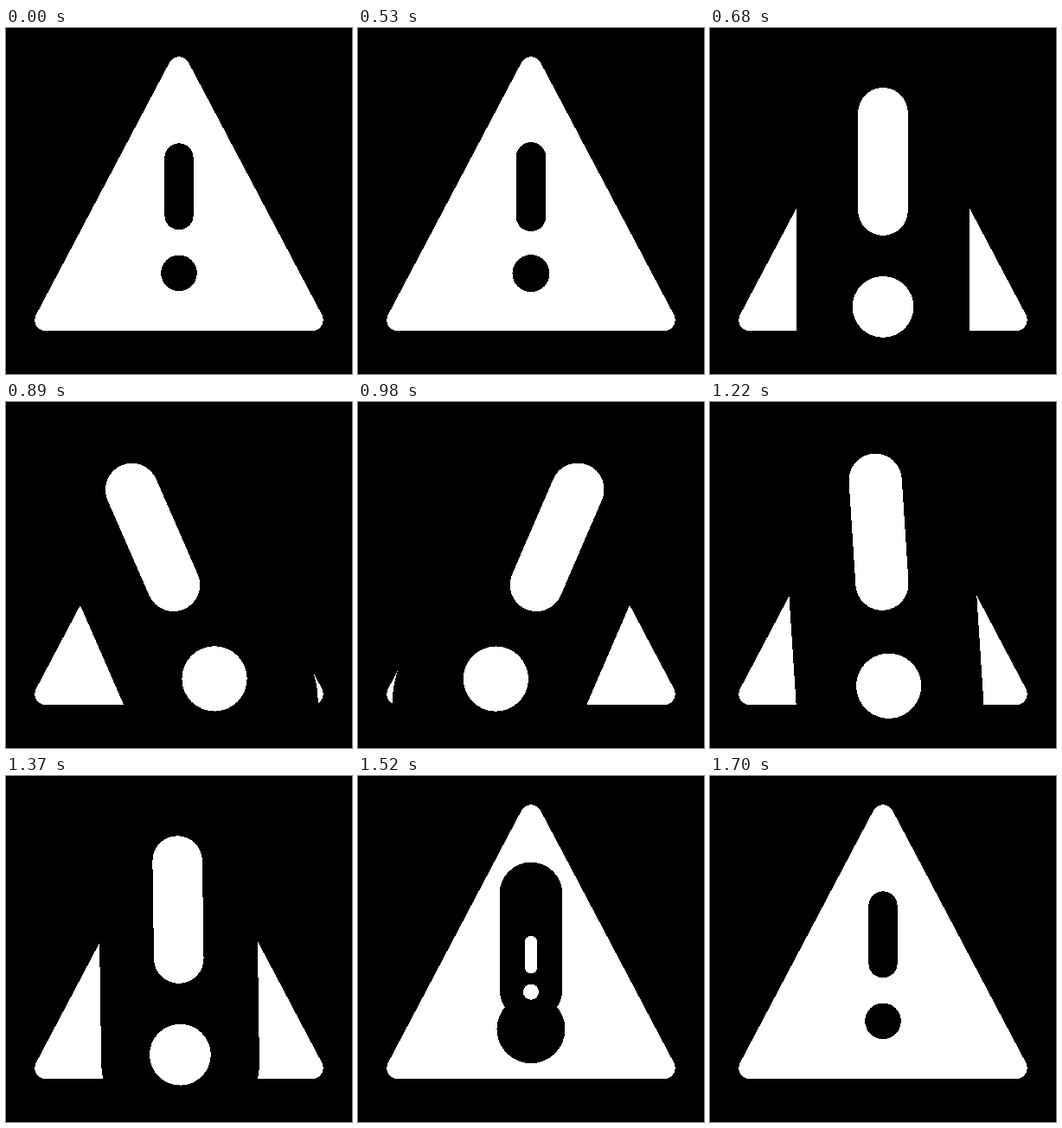
Recreate the animation shown at these times as an HTML page. Size 400 px wide and 400 px high, loop 1.73 s.

```html
<!DOCTYPE html>
<html lang="en">
<head>
<meta charset="utf-8">
<title>Warning sign</title>
<style>
  html, body { margin: 0; width: 100%; height: 100%; overflow: hidden; background: #000; }
  svg { display: block; width: 100%; height: 100%; }
  line { stroke-linecap: round; }
</style>
</head>
<body>
<svg viewBox="0 0 400 400" shape-rendering="crispEdges">
  <path d="M200 45.8 354.2 337.5H45.8Z" fill="#fff" stroke="#fff" stroke-width="25" stroke-linejoin="round"/>
  <g id="mark">
    <g fill="#000" stroke="none">
      <line id="holeBar" x1="200" x2="200" stroke="#000"/>
      <circle id="holeDot" cx="200"/>
    </g>
    <g id="sign" fill="#fff">
      <line x1="200" y1="149.8" x2="200" y2="216.6" stroke="#fff" stroke-width="34"/>
      <circle cx="200" cy="282.3" r="20.9"/>
    </g>
  </g>
</svg>
<script>
const LOOP = 1730, HOLD = 530, STEP = 30;
const PIVOT = 226, SIGN_CENTER = 224.6, SIGN_SCALE = 1.8;

// [step, degrees]
const SHAKE = [[7.3, 0], [10.3, 25], [13.3, -25], [16.33, 25],
               [19.38, -25], [22.35, 25], [25.35, -25], [29.45, 0]];

const $ = id => document.getElementById(id);
const mark = $('mark'), sign = $('sign'), holeBar = $('holeBar'), holeDot = $('holeDot');

const mix = (a, b, p) => a + (b - a) * p;

function ease(n, start, end) {
  const x = Math.min(1, Math.max(0, (n - start) / (end - start)));
  return x * x * (3 - 2 * x);
}

const pulse = (n, inStart, inEnd, outStart, outEnd) =>
  ease(n, inStart, inEnd) - ease(n, outStart, outEnd);

function shakeAngle(n) {
  let angle = 0;
  for (let i = 1; i < SHAKE.length; i++) {
    const [start, from] = SHAKE[i - 1], [end, to] = SHAKE[i];
    angle += (to - from) * ease(n, start, end);
  }
  return angle;
}

function setAttrs(el, attrs) {
  for (const key in attrs) el.setAttribute(key, attrs[key]);
}

function draw(time) {
  const n = time < HOLD ? 0 : Math.floor((time - HOLD) / STEP) + 1;
  const hole = pulse(n, 0.66, 7.2, 25.8, 37.5);
  const scale = SIGN_SCALE * pulse(n, 1, 6.86, 27.6, 37);

  setAttrs(holeBar, {
    y1: mix(150, 85, hole),
    y2: mix(216.67, 357, hole),
    'stroke-width': 2 * mix(16.67, 108.2, hole)
  });
  setAttrs(holeDot, { cy: mix(283.33, 327, hole), r: mix(20.83, 107.7, hole) });
  setAttrs(sign, {
    transform: `translate(200 ${SIGN_CENTER}) scale(${scale}) translate(-200 ${-SIGN_CENTER})`
  });
  setAttrs(mark, { transform: `rotate(${shakeAngle(n)} 200 ${PIVOT})` });
}

const began = performance.now();
function tick() {
  draw((performance.now() - began) % LOOP);
  requestAnimationFrame(tick);
}
tick();
</script>
</body>
</html>
```
